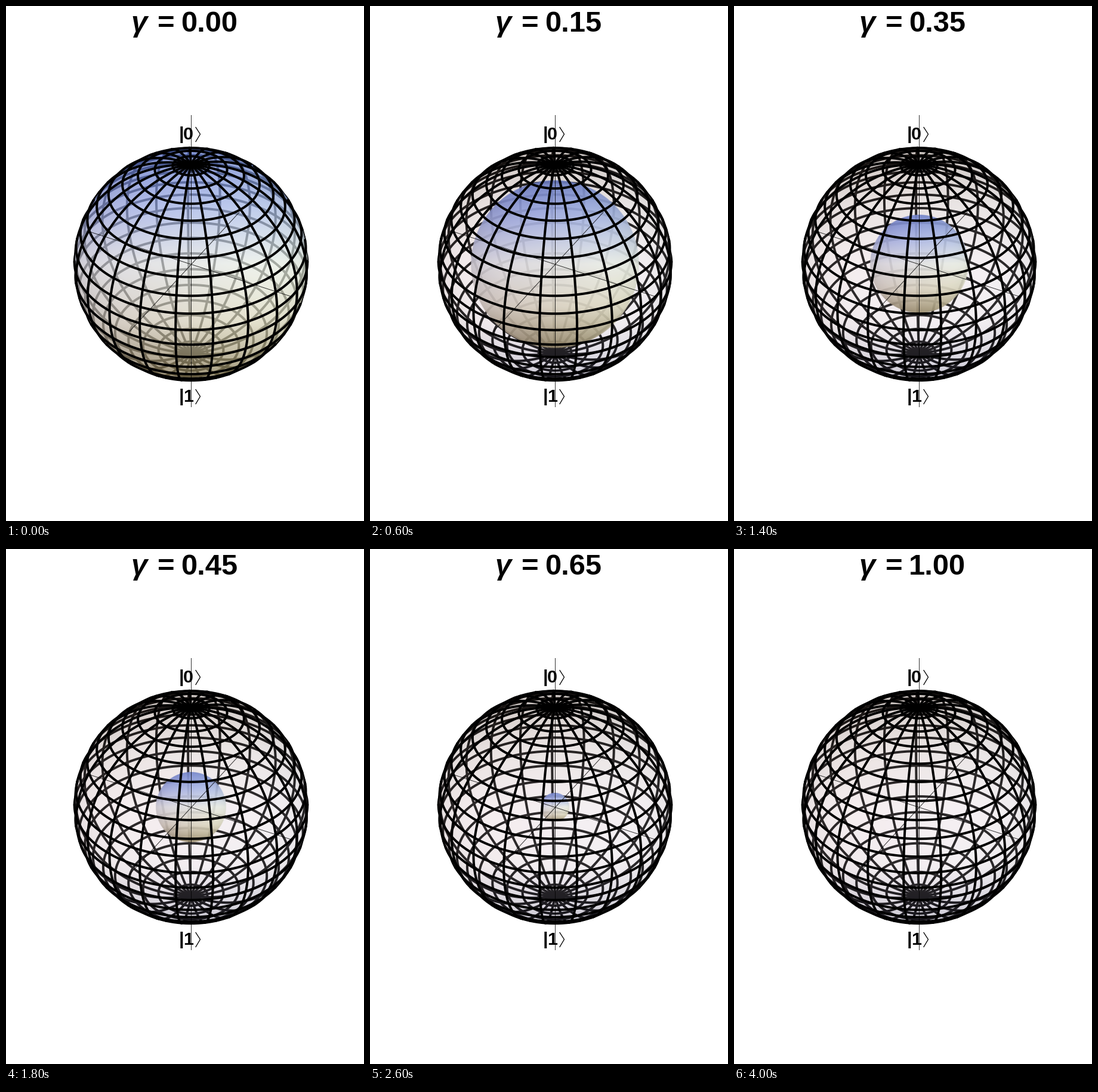
A matplotlib script that plays this animation: 600 by 864 pixels, repeating every 4.2 s.

```python
import numpy as np
import matplotlib.pyplot as plt
from matplotlib.animation import FuncAnimation
from matplotlib.colors import LinearSegmentedColormap

W, H, DPI = 600, 864, 100
CX, CY = 310, 433
RADIUS = 195.3           # outline of the unit sphere, in pixels
DIVISIONS = 21
FRAMES, INTERVAL = 21, 200
PX = 72 / DPI            # points per pixel

# The camera aims at a box whose centre lies a little below the sphere's.
camera = 3.09 * np.array([1.3, -2.4, 2.0]) - [0, 0, .095]
dist = np.linalg.norm(camera)
focal = RADIUS * np.sqrt(dist**2 - 1)
view = camera / dist
right = np.cross([0, 0, 1], view)
right /= np.linalg.norm(right)
up = np.cross(view, right)


def shaded_disc(stops, tilt, rim, size=400):
    """RGBA disc: vertical gradient, sideways colour tilt, darker rim."""
    c = (np.arange(size) + .5) / size * 2 - 1
    u, v = np.meshgrid(c, -c)
    rho = np.hypot(u, v)
    rgb = LinearSegmentedColormap.from_list("", stops)((1 - v) / 2)[..., :3]
    rgb = (rgb + u[..., None] * tilt) * (1 - rim * rho**6)[..., None]
    alpha = np.clip((1 - rho) * size / 2, 0, 1)
    return np.clip(np.dstack([rgb, alpha]), 0, 1)


def extent(r):
    s = focal * r / np.sqrt(dist**2 - r**2)
    return (CX - s, CX + s, CY + s, CY - s)


def mesh_curves():
    theta = np.linspace(0, np.pi, 181)
    phi = np.linspace(0, 2 * np.pi, 361)
    step = np.pi / DIVISIONS
    pairs = [(k * step, phi) for k in range(1, DIVISIONS)]
    pairs += [(theta, 2 * k * step) for k in range(DIVISIONS)]
    for t, p in pairs:
        t, p = np.broadcast_arrays(t, p)
        yield np.stack([np.sin(t) * np.cos(p), np.sin(t) * np.sin(p),
                        np.cos(t)], axis=-1)


def project(points):
    scale = focal / (dist - points @ view)
    return CX + scale * (points @ right), CY - scale * (points @ up)


fig = plt.figure(figsize=(W / DPI, H / DPI), dpi=DPI, facecolor="white")
ax = fig.add_axes([0, 0, 1, 1])


def disc(rgba, alpha, z):
    return ax.imshow(rgba, extent=extent(1), alpha=alpha, zorder=z,
                     aspect="auto", interpolation="bilinear")


def line(xs, ys, width, z, **kw):
    ax.plot(xs, ys, color="black", lw=width * PX, zorder=z, **kw)


def label(x, y, s, size, **kw):
    return ax.text(x, y, s, fontsize=size * PX, family="Liberation Sans",
                   weight="bold", va="baseline", zorder=9, **kw)


film = shaded_disc(["#8c7468", "#c8b8b6", "#e4d4da", "#e0d2da", "#8c84a8"],
                   tilt=[0, .03, .04], rim=.2)
disc(film, .2, 1)
ball = disc(shaded_disc(["#6480e0", "#a2b4ea", "#e2e6e4", "#d8d2bc", "#94855a"],
                        tilt=[.06, .08, .03], rim=.1), .72, 3)
front_film = disc(film, .2, 4)

for curve in mesh_curves():
    x, y = project(curve)
    facing = curve @ view > 1 / dist
    for side, z in ((facing, 6), (~facing, 2)):
        # Widen by one sample so both halves meet at the rim.
        side = side | np.roll(side, 1) | np.roll(side, -1)
        line(np.where(side, x, np.nan), np.where(side, y, np.nan), 4, z,
             solid_capstyle="round", solid_joinstyle="round")

line([309.5, 309.5], [183, 672], 1, 5, alpha=.8)
line([141, 480], [379, 488], .9, 5, alpha=.85)
line([207, 391], [546, 346], .9, 5, alpha=.85)

for digit, base in (("0", 224.5), ("1", 664.5)):
    label(290, base, "|", 30.5)
    label(297, base, digit, 30.5)
    line([318, 325.5, 318], [base - 21, base - 9.5, base + 3], 1.3, 9)

label(209.5, 43.3, "γ", 49, style="italic")
label(253.5, 43.3, "=", 49)
value = label(293, 43.3, "0.00", 49)

ax.set_xlim(0, W)
ax.set_ylim(H, 0)
ax.axis("off")


def update(i):
    gamma = i / (FRAMES - 1)
    r = (1 - gamma)**2
    value.set_text(f"{gamma:.2f}")
    ball.set_visible(r > 0)
    ball.set_extent(extent(max(r, 1e-3)))
    # A shrunken ball hides the far mesh with both of its walls.
    ball.set_alpha(.72 if i == 0 else .92)
    front_film.set_visible(i > 0)
    ax.set_xlim(0, W)
    ax.set_ylim(H, 0)
    return ball, front_film, value


anim = FuncAnimation(fig, update, frames=FRAMES, interval=INTERVAL,
                     repeat=True, repeat_delay=0, blit=False)
plt.show()
```
